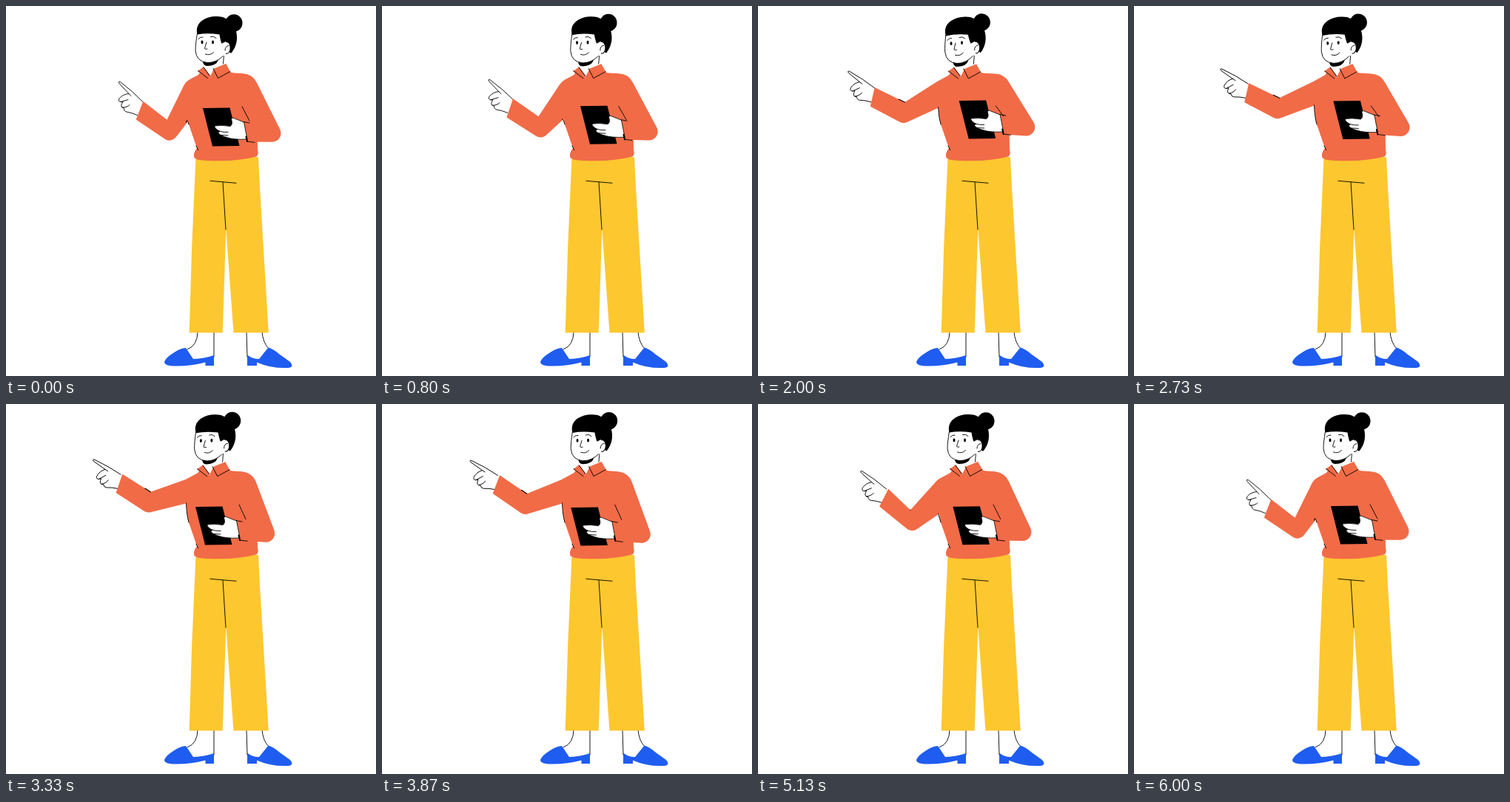
Write an HTML page with a canvas that moves like this. It is 500 px wide and 500 px high and loops after 6030 ms.

```html
<!DOCTYPE html>
<html lang="en">
<head>
<meta charset="utf-8">
<title>Presenter</title>
<style>
html, body { margin: 0; width: 100%; height: 100%; overflow: hidden; background: #fff; }
canvas { display: block; width: 100vw; height: 100vh; }
</style>
</head>
<body>
<canvas id="stage" width="500" height="500"></canvas>
<script>
const ctx = document.getElementById('stage').getContext('2d');
const LOOP = 6030, RAD = Math.PI / 180;
const INK = '#000', SKIN = '#fff', SHIRT = '#f16b47', PANTS = '#fdc72f', SHOE = '#1f5cf0';
const SHOULDER = { x: 248, y: 118 }, UPPER = 57, FORE = 47;

function ease(time, from, to) {
  const u = Math.max(0, Math.min(1, (time - from) / (to - from)));
  return u * u * (3 - 2 * u);
}

// The gesture is a chain of overlapping eased moves that ends where it began
function poseAt(time) {
  const raise = ease(time, 450, 1400);
  const stretch = ease(time, 1330, 2600);
  const drop = ease(time, 2570, 3350);
  const settle = ease(time, 3330, 4530);
  const lower = ease(time, 4450, 5700);
  const back = ease(time, 4400, 5450);

  const upper = 60 - 27 * raise - 12 * stretch - 6.5 * drop + 6 * settle + 39.5 * lower;
  const fore = 34 - 7 * raise - 2 * stretch + 7 * drop + 4 * settle - 2 * lower + 5 * Math.sin(Math.PI * lower);
  const wrist = -3 * raise - 9 * stretch + 12 * lower;
  const lean = raise - .25 * stretch - .4 * drop - .35 * settle;
  const tx = 6.5 * raise - 1.5 * stretch - 15 * drop - 1.5 * settle + 11.5 * back;
  const ty = -9 * raise - 1.8 * stretch + 11.8 * drop + 2.5 * settle - 3.5 * back;

  const ex = SHOULDER.x - UPPER * Math.cos(upper * RAD);
  const ey = SHOULDER.y + UPPER * Math.sin(upper * RAD);
  return {
    upper, fore, wrist, ex, ey, tx, ty,
    pit: 134 + Math.max(0, ey - 140) * .85,
    kx: 379 + tx, ky: 184 + ty + 3 * (raise - back),
    dx: -2.5 * lean, dy: .5 * lean, tilt: -4 * lean
  };
}

function paint(path, fill, stroke, width = 1) {
  const p = new Path2D(path);
  if (fill) { ctx.fillStyle = fill; ctx.fill(p); }
  if (stroke) { ctx.strokeStyle = stroke; ctx.lineWidth = width; ctx.stroke(p); }
}
const line = (path, width = .9) => paint(path, null, INK, width);

function oval(x, y, rx, ry, fill, stroke) {
  ctx.beginPath();
  ctx.ellipse(x, y, rx, ry, 0, 0, 7);
  ctx.fillStyle = fill;
  ctx.fill();
  if (stroke) { ctx.strokeStyle = stroke; ctx.lineWidth = 1; ctx.stroke(); }
}

function moved(dx, dy, angle, px, py, draw) {
  ctx.save();
  ctx.translate(px + dx, py + dy);
  ctx.rotate(angle * RAD);
  ctx.translate(-px, -py);
  draw();
  ctx.restore();
}

function drawLegs() {
  line('M259 440 Q259 459 245 464 M281 440 V474');
  line('M325 440 L326 474 M346 440 Q347 455 355 463');
  paint('M243 462 L253 477 Q268 476.500 281 472 V486 H269.500 V481.500 Q250 486.500 232 486.500 Q214 487 214 481 Q216 475 226 469 Q234 463 243 462Z', SHOE);
  paint('M326 471.500 Q333 477 342 477 L354.500 461.500 Q361 463 370 471 L384 481 Q390 488 381 489 Q358 490 339 481.500 V486 H326Z', SHOE);
  paint('M256.500 204 H341 L343.300 250 L354.800 441.500 H307.500 L297.300 301 L292.700 441.500 H247.700 L251 330Z', PANTS);
  line('M276 236.300 L311 239.300 M293 238 L297 302');
}

function drawTorso({ dx, dy, pit }) {
  const x = n => n + dx, y = n => n + dy;
  paint(`M${x(267)} ${y(82)} L${x(260)} ${y(93)} L250 103 L243.500 132 Q244 150 247 160
    L258 192 Q252 200 254.500 205 Q257 208 268 208.700 Q310 211 338 203.500 Q342 202 340 194
    L339 130 L333 103 L${x(303)} ${y(89)} L${x(297)} ${y(78)}Z`, SHIRT);
  line(`M243.500 ${pit} Q244 150 247 160 M257 189 L259.500 194.500`);
}

function drawPointing({ ex, ey, upper, fore, wrist, dx, dy, pit }) {
  const cx = ex - FORE * Math.cos(fore * RAD), cy = ey - FORE * Math.sin(fore * RAD);
  const cuff = (fore - 13) * RAD, sx = 13.3 * Math.sin(cuff), sy = 13.3 * Math.cos(cuff);
  const topX = cx + sx, topY = cy - sy;
  const inX = ex + 4 - upper * .1, inY = ey - 13.5;

  moved(cx - 180.5, cy - 141, wrist, 180.5, 141, () => {
    paint(`M185 129.500 Q171 115 154.500 102.500 Q151.500 101 153 104.500 L166 118.500
      Q158 119 153 125 Q151 129 155 129.500 L158 129.500 Q154 135 157 137
      L159.500 138 Q159 142 163 143 Q170 144 177.500 147.500`, SKIN, INK, .9);
    line('M166 118.500 L169 121.500 M155 129.500 L165 126.500 M157 137 Q164 137 167 133.500');
  });

  ctx.beginPath();
  ctx.moveTo(topX, topY);
  ctx.lineTo(inX, inY);
  ctx.arcTo(243 + dx * .3, 102, 260 + dx, 93 + dy, 20);
  ctx.lineTo(260 + dx, 93 + dy);
  ctx.lineTo(262, 135);
  ctx.lineTo(245, pit);
  ctx.arcTo(ex + upper * .13 - 4, ey + 14 + upper * .07, cx - sx, cy + sy, 11);
  ctx.lineTo(cx - sx, cy + sy);
  ctx.closePath();
  ctx.fillStyle = SHIRT;
  ctx.fill();

  const fold = .2 * (1 - ease(upper, 33, 44));
  if (fold) line(`M${inX} ${inY} L${inX + (topX - inX) * fold} ${inY + (topY - inY) * fold}`, 1.1);
}

function drawHolding({ tx, ty, kx, ky, dx, dy }) {
  ctx.beginPath();
  ctx.moveTo(302 + dx, 90 + dy);
  ctx.arcTo(333 + dx * .3, 92, kx, ky, 22);
  ctx.arcTo(kx, ky, 326 + tx, 183.5 + ty, 12);
  ctx.lineTo(326 + tx, 183.5 + ty);
  ctx.lineTo(321 + tx, 157 + ty);
  ctx.lineTo(318, 135);
  ctx.closePath();
  ctx.fillStyle = SHIRT;
  ctx.fill();
  line(`M${319 + tx * .4} ${136 + ty * .1} L${329 + tx * .5} ${155 + ty * .6}`);

  moved(tx, ty, 0, 0, 0, () => {
    paint('M266 138 L302.500 137.500 L315.500 189 L279 189.500Z', INK);
    paint(`M282 162 Q291 160.500 303 162.500 Q307 160 304.500 153 Q305 150 309 152 L321.500 157
      L326 180 Q308 181 298 177.500 Q289 175 287 171.500 Q287 170 289 169.500 Q281 165 282 162Z`, SKIN, INK, .8);
    line('M288 169 Q294 171 300 170.500 M291 174.500 L300 175');
    line('M321 156.500 L329 158 M326 183 L336 184.300');
    line('M324.500 176.500 L326 183', 2);
  });
}

function drawHead({ dx, dy, tilt }) {
  moved(dx, dy, 0, 0, 0, () => {
    paint('M266.500 74 L295 66 L297 79 L281 85 L275.500 96 L267 83Z', SKIN);
    line('M294.500 66 L293.500 78');
    paint('M267 82 L259 88 L272 98 L276 94Z', SHIRT);
    paint('M297 78 L303 88.500 L286.500 98 L280 85Z', SHIRT);
    line('M259.500 87.500 L272.500 97.500 M267 83 L275.500 94.500 M280 84.500 L286.500 97.500 L303 88.500');
  });
  moved(dx, dy, tilt, 283, 80, () => {
    paint('M266 74 Q276 77 287 73 Q284 81 272 81 Q266 81 266 74Z', INK);
    paint('M258.500 37 Q256 52 256 60 Q257 75 272 76.500 Q284 77 294 67 L300 40 L280 30Z', SKIN, INK, .9);
    paint(`M258.500 38.500 Q255.500 26 266 19 Q277 12 293 15 Q307 20 311 34 Q315 51 304 64
      L293 54 Q290 49 288.500 38.500 Q272 36 258.500 38.500Z`, INK);
    oval(308, 23, 11.5, 11.8, INK);
    oval(298, 56.5, 5.2, 8, SKIN, INK);
    paint('M291 51 L297 48 L297 67 L290 68Z', SKIN);
    line('M296 60 Q296 54 301 53.500');
    for (const x of [265, 279.5]) oval(x, 49, 1.5, 2.4, INK);
    line('M260 44.500 Q262.500 41.500 266 42 M276.500 41.500 Q281 40 284 43.500');
    line('M271 49 Q269 55 268.500 57.500 Q270 59 272 58');
    line('M269.500 65 Q276 67.500 280.500 62.500');
  });
}

function draw(time) {
  const pose = poseAt(time);
  ctx.fillStyle = '#fff';
  ctx.fillRect(0, 0, 500, 500);
  ctx.lineCap = ctx.lineJoin = 'round';
  drawLegs();
  for (const part of [drawPointing, drawTorso, drawHolding, drawHead]) part(pose);
}

const start = performance.now();
function tick() {
  draw((performance.now() - start) % LOOP);
  requestAnimationFrame(tick);
}
tick();
</script>
</body>
</html>
```
